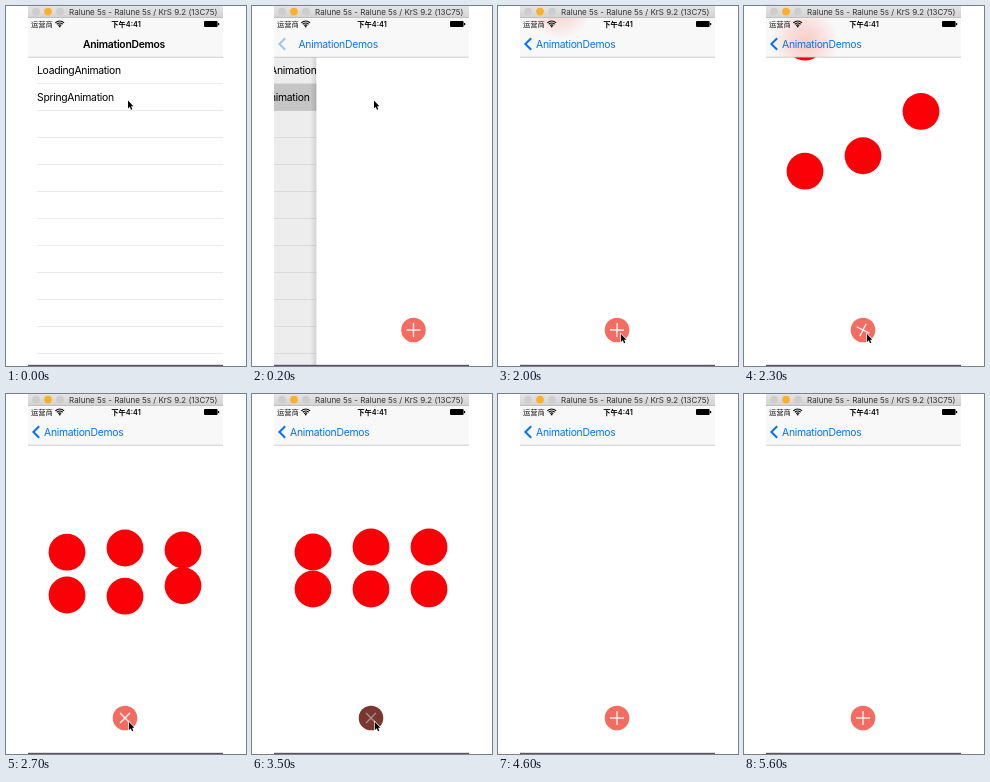
Write an HTML page with a canvas that moves like this. It is 240 px wide and 360 px high and loops after 5.7 s.

```html
<!DOCTYPE html>
<html lang="en">
<head>
<meta charset="utf-8">
<title>AnimationDemos</title>
<style>
  html, body { margin: 0; width: 100%; height: 100%; overflow: hidden; background: #fff; }
  canvas { display: block; width: 240px; height: 360px; }
</style>
</head>
<body>
<canvas id="stage"></canvas>
<script>
const W = 240, H = 360, LOOP = 5700, STEP = 100;
const LEFT = 22, RIGHT = 217, WIDE = RIGHT - LEFT, BAR = 12, NAV = 51, FLOOR = 359;
const SANS = 'Inter, "Noto Sans CJK SC", "Noto Sans CJK", sans-serif';
const CJK = '"Noto Sans CJK SC", "Noto Sans CJK", Inter, sans-serif';
const BLUE = '#0573f2', RED = '#fb0007';

const canvas = document.getElementById('stage');
const scale = window.devicePixelRatio || 1;
canvas.width = W * scale;
canvas.height = H * scale;
const ctx = canvas.getContext('2d');

const clamp = v => Math.max(0, Math.min(1, v));
const mix = (a, b, k) => a + (b - a) * k;
const smooth = k => { k = clamp(k); return k * k * (3 - 2 * k); };

// Remaining distance (1 to 0) of a damped spring after s seconds.
function spring(s, w, zeta) {
  if (s <= 0) return 1;
  const tau = w * s;
  if (zeta >= 1) return (1 + tau) * Math.exp(-tau);
  const d = Math.sqrt(1 - zeta * zeta);
  return Math.exp(-zeta * tau) * (Math.cos(d * tau) + zeta / d * Math.sin(d * tau));
}

function box(x, y, w, h, fill) {
  ctx.fillStyle = fill;
  ctx.fillRect(x, y, w, h);
}

function disc(x, y, r, fill) {
  ctx.fillStyle = fill;
  ctx.beginPath();
  ctx.arc(x, y, r, 0, Math.PI * 2);
  ctx.fill();
}

function line(points, color, width) {
  ctx.strokeStyle = color;
  ctx.lineWidth = width;
  ctx.beginPath();
  points.forEach(([x, y], i) => i ? ctx.lineTo(x, y) : ctx.moveTo(x, y));
  ctx.stroke();
}

function text(str, x, y, font, color, { align = 'left', track = 0, alpha = 1 } = {}) {
  ctx.save();
  ctx.globalAlpha = alpha;
  ctx.font = font;
  ctx.letterSpacing = track + 'px';
  ctx.textAlign = align;
  ctx.fillStyle = color;
  ctx.fillText(str, x, y);
  ctx.restore();
}

function clipTo(x, y, w, h, draw) {
  ctx.save();
  ctx.beginPath();
  ctx.rect(x, y, w, h);
  ctx.clip();
  draw();
  ctx.restore();
}

// Six balls drop in row by row, then fall out with the lower row first.
const DROP = 490, END_Y = 380;
const balls = [0, 1, 2, 3, 4, 5].map(i => ({
  x: 61 + 58 * (i % 3),
  home: i === 0 ? 158 : i < 3 ? 153 : 195,
  enter: 1800 + 100 * i,
  leave: 3612 + 60 * ((i + 3) % 6)
}));

function ballY(b, t) {
  if (t >= b.leave) return mix(END_Y, b.home, spring((t - b.leave) / 1000, 19.5, 1));
  return b.home - DROP * spring((t - b.enter) / 1000, 10, 0.8);
}

function drawList(p, t) {
  const dx = -0.33 * WIDE * p;
  box(LEFT, NAV, WIDE, FLOOR - NAV, '#fff');
  if (t >= 100) box(LEFT, 78, WIDE, 27, '#d4d4d4');
  for (let i = 1; i <= 11; i++) box(31 + dx, 50.5 + 26.95 * i, WIDE, 0.6, '#dcdcde');
  const font = '10.36px ' + SANS;
  text('LoadingAnimation', 31 + dx, 68, font, '#000', { track: -0.27 });
  text('SpringAnimation', 31 + dx, 95, font, '#000', { track: -0.27 });
  box(LEFT, NAV, WIDE, FLOOR - NAV, `rgba(0,0,0,${0.09 * p})`);
}

function drawButton(x, t) {
  const turn = smooth((t - 1900) / 700) - smooth((t - 3600) / 600);
  const pressed = (t >= 1800 && t < 1900) || (t >= 3400 && t < 3600);
  disc(x, 324, 12.3, pressed ? '#7a3731' : '#f26c61');
  ctx.save();
  ctx.translate(x, 324);
  ctx.rotate(turn * Math.PI / 4);
  const ink = pressed ? '#a58e8c' : '#fff1ef';
  line([[-7, 0], [7, 0]], ink, 1.4);
  line([[0, -7], [0, 7]], ink, 1.4);
  ctx.restore();
}

function drawPage(u, t) {
  const dx = WIDE * u, x = LEFT + dx;
  if (u > 0 && u < 1) {
    const shade = ctx.createLinearGradient(x - 6, 0, x, 0);
    shade.addColorStop(0, 'rgba(0,0,0,0)');
    shade.addColorStop(1, 'rgba(0,0,0,0.12)');
    box(x - 6, NAV, 6, FLOOR - NAV, shade);
  }
  box(x, NAV, WIDE, FLOOR - NAV, '#fff');
  drawButton(119 + dx, t);
  balls.forEach(b => disc(b.x, ballY(b, t), 18.4, RED));
}

function drawStatus() {
  text('运营商', 25, 21, '7.3px ' + CJK, '#111');
  text('下午4:41', 120, 21, '600 7.3px ' + SANS, '#000', { align: 'center' });
  for (const r of [2.2, 4.2, 6.2]) {
    ctx.strokeStyle = '#111';
    ctx.lineWidth = 1.2;
    ctx.beginPath();
    ctx.arc(53.7, 21.2, r, -Math.PI * 0.75, -Math.PI * 0.25);
    ctx.stroke();
  }
  disc(53.7, 20.6, 0.9, '#111');
  ctx.fillStyle = '#000';
  ctx.beginPath();
  ctx.roundRect(198, 15, 13.6, 6, 1);
  ctx.fill();
  box(212, 17, 1.2, 2.2, '#000');
}

function drawNav(p, t) {
  box(LEFT, BAR, WIDE, NAV - BAR, '#f8f8f8');
  clipTo(LEFT, BAR, WIDE, NAV - BAR, () => {
    for (const b of balls) {
      const y = ballY(b, t);
      if (y < -30 || y > 80) continue;
      const glow = ctx.createRadialGradient(b.x, y, 0, b.x, y, 34);
      glow.addColorStop(0, 'rgba(255,80,60,0.27)');
      glow.addColorStop(0.4, 'rgba(255,80,60,0.18)');
      glow.addColorStop(1, 'rgba(255,80,60,0)');
      box(LEFT, BAR, WIDE, NAV - BAR, glow);
    }
  });
  box(LEFT, NAV - 0.2, WIDE, 0.7, '#b9b9bb');
  drawStatus();

  const x = mix(77, 38, p), look = { track: -0.27 };
  text('AnimationDemos', x, 41.5, '600 10.36px ' + SANS, '#000',
    { ...look, alpha: clamp(1 - 1.4 * p) });
  text('AnimationDemos', x, 41.5, '10.36px ' + SANS, BLUE,
    { ...look, alpha: clamp(1.25 * p) });
  ctx.globalAlpha = p ** 4;
  line([[33.2, 32.3], [27.4, 38], [33.2, 43.7]], BLUE, 2);
  ctx.globalAlpha = 1;
}

function drawWindowBar() {
  const grey = ctx.createLinearGradient(0, 0, 0, BAR);
  grey.addColorStop(0, '#e4e4e4');
  grey.addColorStop(1, '#d2d2d2');
  box(LEFT, 0, WIDE, BAR, grey);
  box(LEFT, BAR - 0.6, WIDE, 0.6, '#b4b4b4');
  ['#cdcdcd', '#fdb02c', '#cdcdcd'].forEach((c, i) => disc(30 + 12 * i, 5.6, 3.9, c));
  text('Ralune 5s - Ralune 5s / KrS 9.2 (13C75)', 137.3, 8.7, '8px ' + SANS, '#333',
    { align: 'center' });
}

// Pointer stops: time, x, y.
const stops = [
  [0, 122, 94.5], [300, 122, 94.5], [1200, 117, 348], [1700, 123, 328],
  [3600, 123, 328], [4000, 134, 260], [4600, 165, -14]
];

function drawPointer(t) {
  const i = stops.findIndex(s => s[0] > t);
  if (i < 1) return;
  const [t0, x0, y0] = stops[i - 1], [t1, x1, y1] = stops[i];
  const k = smooth((t - t0) / (t1 - t0));
  ctx.save();
  ctx.translate(mix(x0, x1, k), mix(y0, y1, k));
  ctx.scale(0.88, 0.92);
  ctx.beginPath();
  [[0, 0], [0, 8.6], [2, 6.8], [3.4, 10], [4.9, 9.4], [3.5, 6.3], [6.1, 6.2]]
    .forEach(([x, y]) => ctx.lineTo(x, y));
  ctx.closePath();
  ctx.strokeStyle = '#fff';
  ctx.lineWidth = 1.4;
  ctx.stroke();
  ctx.fillStyle = '#000';
  ctx.fill();
  ctx.restore();
}

function draw(t) {
  ctx.setTransform(scale, 0, 0, scale, 0, 0);
  box(0, 0, W, H, '#fff');
  let u = spring((t - 40) / 1000, 18, 1);
  if (u < 0.004) u = 0;
  const p = 1 - u;
  clipTo(LEFT, NAV, WIDE, FLOOR - NAV, () => {
    if (u > 0) drawList(p, t);
    drawPage(u, t);
  });
  drawNav(p, t);
  drawWindowBar();
  box(LEFT, 358.8, WIDE, 1.2, '#5a5560');
  drawPointer(t);
}

const begin = performance.now();
function tick() {
  const t = (performance.now() - begin) % LOOP;
  draw(Math.floor(t / STEP) * STEP);
  requestAnimationFrame(tick);
}
tick();
</script>
</body>
</html>
```
